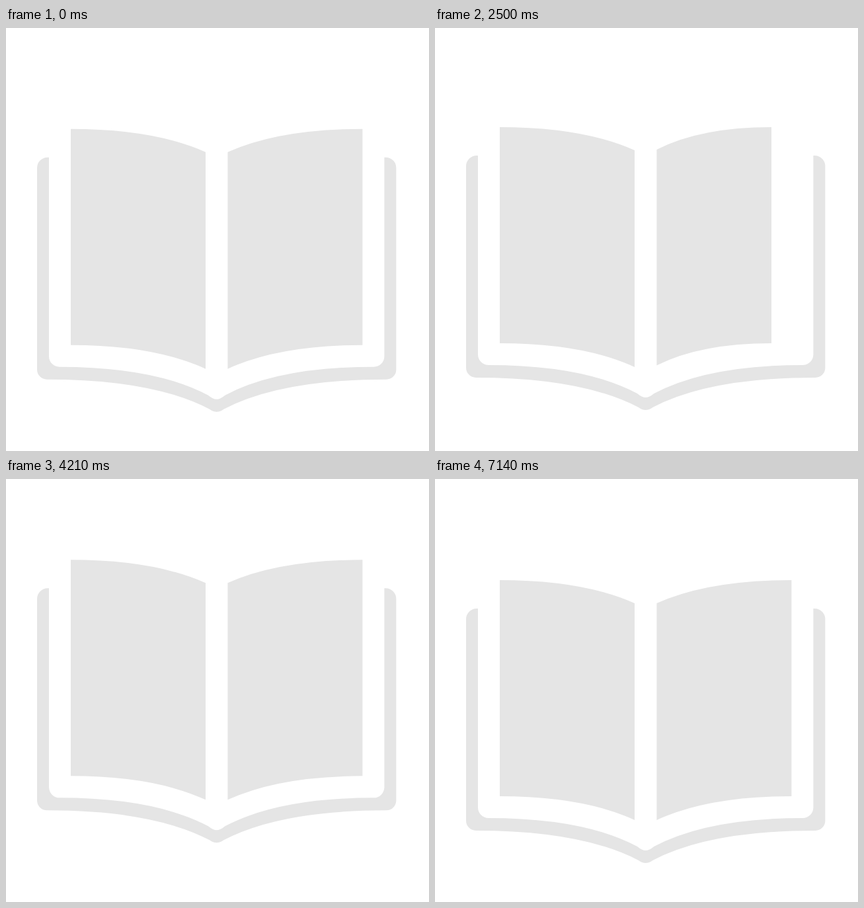
An HTML page for the animation above (7.21 s loop, 640x640 px).

```html
<!DOCTYPE html>
<html lang="en">
<head>
<meta charset="utf-8">
<title>Book loader</title>
<style>
  html, body { margin: 0; width: 100%; height: 100%; overflow: hidden; background: #fff; }
  svg { display: block; width: 100vw; height: 100vh; }
</style>
</head>
<body>
<svg viewBox="0 0 640 640" fill="#e5e5e5">
  <defs>
    <g id="half">
      <path d="M65 196V497A16 16 0 0 0 81 513Q225 513 306 556Q313 562 319 562V581Q313 581 308 577
               Q222 532 62 532A15 15 0 0 1 47 517V212A16 16 0 0 1 63 196Z"/>
      <path d="M98 153Q224 153 302 188V516Q224 480 98 480Z"/>
    </g>
  </defs>
  <g id="book">
    <use href="#half"/>
    <use href="#half" transform="matrix(-1 0 0 1 637.4 0)"/>
    <g id="leaf">
      <path id="sheet" fill="#fff"/>
      <path id="print"/>
    </g>
  </g>
</svg>
<script>
  const LOOP = 7210, FPS = 14, CYCLE = 2.4;
  const SPINE = 318.5, SHEET = 253.5, MARGIN = 33, GUTTER = 302, PRINT = 204;
  const LIFT = 72.5;
  const [book, leaf, sheet, print] =
    ['book', 'leaf', 'sheet', 'print'].map(id => document.getElementById(id));

  const smooth = p => p * p * (3 - 2 * p);

  function lift(phase) {
    const p = (phase + 0.02) % 1 * 2;
    return LIFT * (p < 1 ? smooth(p) : 1 - smooth(p - 1));
  }

  // 1 lies flat on the right, -1 flat on the left
  function turn(phase) {
    const u = Math.max(-1, Math.min(1, (0.325 - phase) / 0.32));
    return Math.sign(u) * Math.abs(u) ** 1.05;
  }

  // The leaf is built on the left side and mirrored while it is on the right
  function drawLeaf(side) {
    const width = SHEET * Math.abs(side);
    const edge = SPINE - width;
    const round = Math.min(16, width * 0.45);
    leaf.setAttribute('transform', side > 0 ? 'matrix(-1 0 0 1 637.4 0)' : '');
    sheet.setAttribute('d', `M${SPINE} 120H${edge}V${513 - round}` +
      `Q${edge} 513 ${edge + round} 513Q${edge + width * 0.62} 513 ${SPINE} 543Z`);

    const inner = width - MARGIN - (SPINE - GUTTER);
    if (inner <= 0) {
      print.setAttribute('d', '');
      return;
    }
    const left = edge + MARGIN;
    const bend = left + inner * 0.618;
    const top = 188 - (PRINT - inner) * 0.034;
    const bottom = 516 - (PRINT - inner) * 0.08;
    print.setAttribute('d', `M${left} 153Q${bend} 153 ${GUTTER} ${top}` +
      `V${bottom}Q${bend} 480 ${left} 480Z`);
  }

  function draw(ms) {
    const step = Math.floor((ms % LOOP + 5) * FPS / 1000);
    const phase = step / FPS / CYCLE % 1;
    const side = turn(phase);
    book.setAttribute('transform', `translate(0 ${-lift(phase)})`);
    leaf.style.display = Math.abs(side) < 1 ? '' : 'none';
    drawLeaf(side);
  }

  const start = performance.now();
  function tick() {
    draw(performance.now() - start);
    requestAnimationFrame(tick);
  }
  tick();
</script>
</body>
</html>
```
